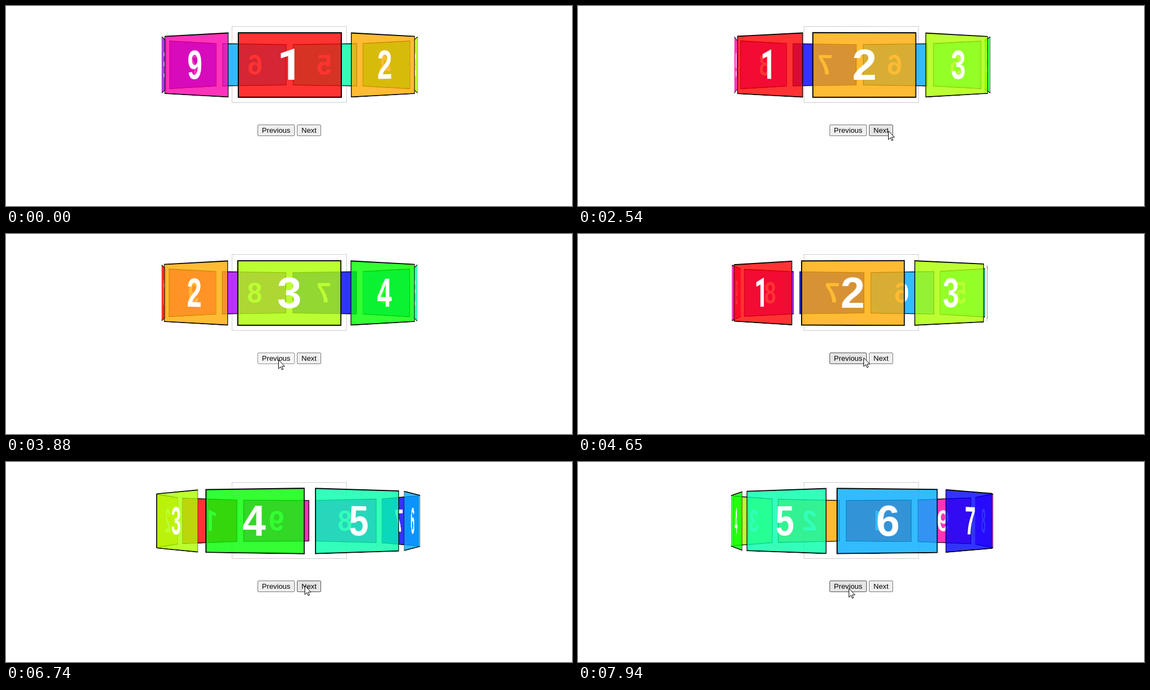
An HTML page that plays this animation: 1033x366 px, repeating every 8 s.

```html
<!DOCTYPE html>
<html lang="en">
<head>
<meta charset="utf-8">
<title>3D carousel</title>
<style>
  * { box-sizing: border-box; }
  html, body { margin: 0; width: 100%; height: 100%; overflow: hidden; background: #fff; }
  body { position: relative; font-family: "Liberation Sans", Arial, sans-serif; }

  .scene {
    position: absolute; left: 412px; top: 37px; width: 210px; height: 140px;
    border: 1px solid #ccc; perspective: 1000px;
  }
  .carousel { position: absolute; width: 100%; height: 100%; transform-style: preserve-3d; }
  .cell {
    position: absolute; left: 10px; top: 10px; width: 190px; height: 120px;
    border: 2px solid #000; color: #fff; text-align: center;
    font-size: 80px; font-weight: bold; line-height: 116px;
  }
  /* a "1" without a foot */
  .cell:first-child span { font-family: Roboto, sans-serif; line-height: 0; }

  .button {
    position: absolute; top: 217px; height: 21px;
    border: 1px solid #767676; border-radius: 2px; background: #efefef;
    color: #000; font-size: 13.333px; line-height: 19px; text-align: center;
  }
  .button.hover { border-color: #4f4f4f; background: #e5e5e5; }
  .button.active { border-color: #8d8d8d; background: #f5f5f5; }
  #previous { left: 459px; width: 68px; }
  #next { left: 531px; width: 44px; }

  #pointer { position: absolute; left: 0; top: 0; width: 12px; height: 20px; overflow: visible; }
</style>
</head>
<body>
<div class="scene"><div class="carousel" id="carousel"></div></div>
<div class="button" id="previous">Previous</div>
<div class="button" id="next">Next</div>
<svg id="pointer">
  <circle id="halo" cx="-1" cy="0" r="12" fill="rgb(248,242,0)" fill-opacity=".55"/>
  <path d="M.5 .5V16.5L4.2 13L6.6 18.5L8.9 17.5L6.5 12.1H11.6Z" fill="#fff" stroke="#000"/>
</svg>
<script>
const LOOP = 8000;
const TICK = 70;        // the picture refreshes this often
const TICK_PHASE = 20;
const CELLS = 9;
const STEP = 360 / CELLS;
const RADIUS = 288;
const TURN_MS = 1000;

// Times at which the mouse button is released.
const CLICKS = [1742, 2860, 3985, 5293, 5775, 6514, 7258, 7817];

// Where the pointer comes to rest: [arrival time, x, y]
const ENTRY = { time: 130, x: 918, y: 317 };
const STOPS = [
  [890, 566, 220], [1250, 555, 223], [2450, 566, 228], [3500, 497, 230],
  [4860, 551, 221], [6400, 545, 226], [7680, 494, 231]
];

const byId = id => document.getElementById(id);
const carousel = byId('carousel');
const pointer = byId('pointer');
const halo = byId('halo');
const previous = byId('previous');
const next = byId('next');

for (let i = 0; i < CELLS; i++) {
  const cell = document.createElement('div');
  cell.className = 'cell';
  cell.innerHTML = `<span>${i + 1}</span>`;
  cell.style.background = `hsla(${i * STEP}, 100%, 50%, 0.8)`;
  cell.style.transform = `rotateY(${i * STEP}deg) translateZ(${RADIUS}px)`;
  carousel.append(cell);
}

const clamp = p => Math.min(1, Math.max(0, p));
const bezier = (s, a, b) => 3 * (1 - s) ** 2 * s * a + 3 * (1 - s) * s * s * b + s ** 3;

// CSS "ease": cubic-bezier(.25, .1, .25, 1)
function ease(p) {
  let low = 0, high = 1;
  for (let i = 0; i < 24; i++) {
    const mid = (low + high) / 2;
    if (bezier(mid, .25, .25) < clamp(p)) low = mid; else high = mid;
  }
  return bezier(low, .1, 1);
}

// The pointer glides to each stop; longer ways take longer.
function tipAt(time) {
  let { x, y } = ENTRY;
  for (const [arrival, stopX, stopY] of STOPS) {
    const dx = stopX - x, dy = stopY - y;
    const duration = 350 + 1.1 * Math.hypot(dx, dy);
    const p = clamp(1 + (time - arrival) / duration);
    const eased = p * p * (3 - 2 * p);
    x += dx * eased;
    y += dy * eased;
    if (p < 1) break;
  }
  return { x: Math.round(x), y: Math.round(y) };
}

function isOver(button, { x, y }) {
  const dx = x - button.offsetLeft, dy = y - button.offsetTop;
  return dx >= 0 && dx < button.offsetWidth && dy >= 0 && dy < button.offsetHeight;
}

// Each click starts a new turn from wherever the last one had got to.
function angleAt(time) {
  let from = 0, target = 0, start = 0;
  const at = t => from + (target - from) * ease((t - start) / TURN_MS);
  for (const click of CLICKS.filter(t => t <= time)) {
    from = at(click);
    target += isOver(previous, tipAt(click)) ? STEP : -STEP;
    start = click;
  }
  return at(time);
}

const nearClick = (time, before, after) =>
  CLICKS.some(t => time >= t - before && time < t + after);

function render(time) {
  carousel.style.transform = `translateZ(${-RADIUS}px) rotateY(${angleAt(time)}deg)`;

  const tip = tipAt(time);
  const shown = time >= ENTRY.time;
  pointer.style.display = shown ? '' : 'none';
  pointer.style.transform = `translate(${tip.x}px, ${tip.y}px)`;
  halo.style.display = nearClick(time, 90, 30) ? '' : 'none';

  for (const button of [previous, next]) {
    const over = shown && isOver(button, tip);
    button.classList.toggle('hover', over);
    button.classList.toggle('active', over && nearClick(time, 120, 0));
  }
}

const snap = time => Math.floor((time - TICK_PHASE) / TICK) * TICK + TICK_PHASE;

const begin = performance.now();
function frame() {
  render(snap((performance.now() - begin) % LOOP));
  requestAnimationFrame(frame);
}
frame();
</script>
</body>
</html>
```
